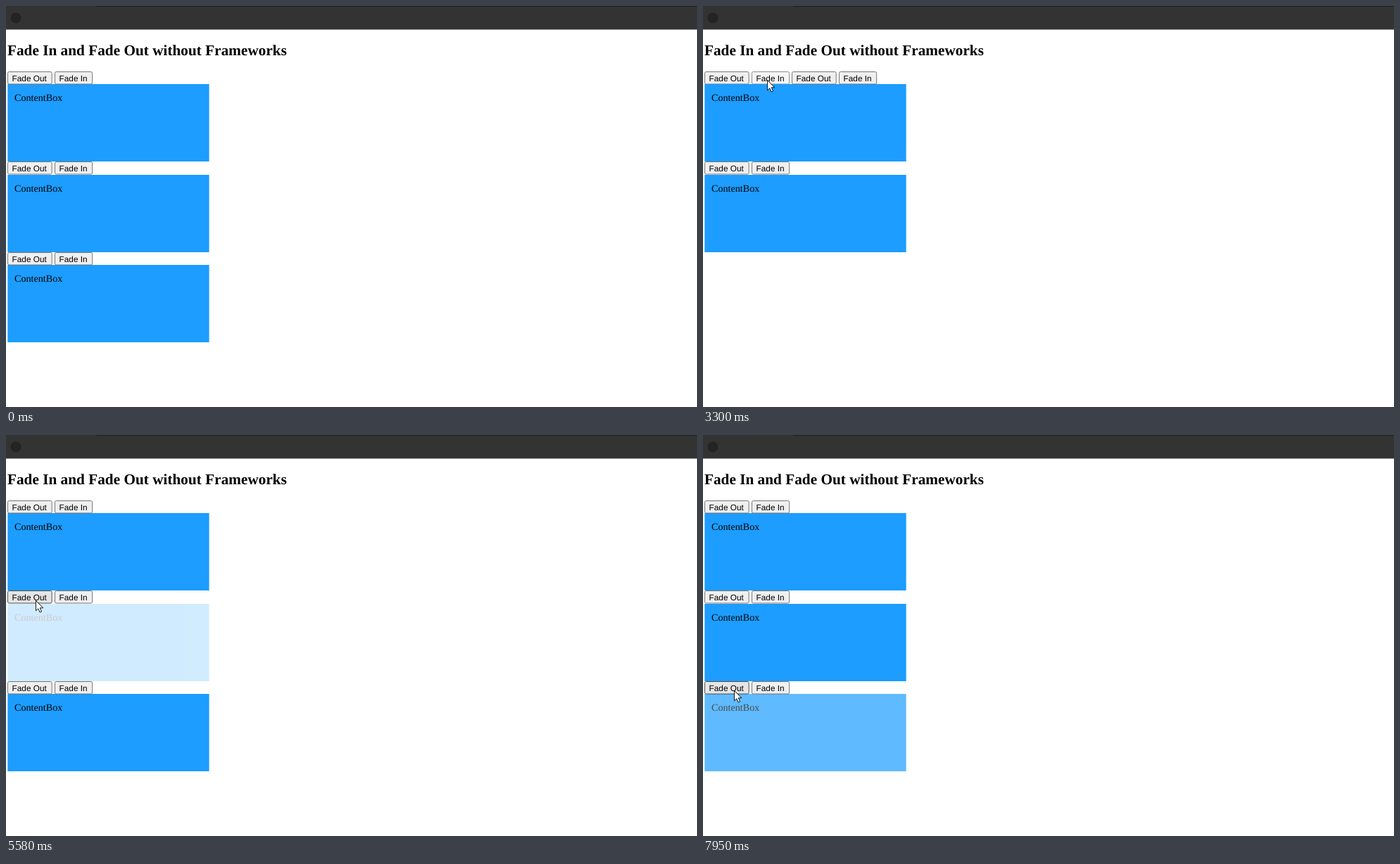
Animation, 982 px wide and 570 px high, one loop 8000 ms. Source, as an HTML page:

```html
<!DOCTYPE html>
<html lang="en">
<head>
<meta charset="utf-8">
<title>Fade In and Fade Out</title>
<style>
  html, body { margin: 0; width: 100%; height: 100%; overflow: hidden; background: #fff; }
  svg { display: block; }
  text { text-rendering: geometricPrecision; font-family: "Liberation Serif", serif; }
  .title { font-size: 21.27px; font-weight: bold; }
  .label { font-size: 14.15px; }
  .button text { font: 11.8px "Liberation Sans", sans-serif; }
  .button rect { fill: #efefef; stroke: #767676; }
  .button.hover rect { fill: #e5e5e5; stroke: #4f4f4f; }
  .button.pressed rect { fill: #f5f5f5; stroke: #8d8d8d; }
</style>
</head>
<body>
<svg width="982" height="570" viewBox="0 0 982 570">
  <rect width="982" height="33.5" fill="#333"/>
  <rect x="128" width="854" height="1" fill="#1e1e1e"/>
  <circle cx="14" cy="17" r="7.5" fill="#242424"/>
  <text class="title" x="2" y="70">Fade In and Fade Out without Frameworks</text>
  <g id="panels"></g>
  <path id="cursor" d="M.5 .5V14.8L3.8 11.8 6.2 17 8.6 16 6.3 10.8H10.9Z" fill="#fff" stroke="#000" stroke-width=".9"/>
</svg>
<script>
const LOOP = 8000, ENTER = 100;
const TOP = 93, ROW = 128.4, PAIR_W = 124, BUTTON_H = 18.5, BOX_H = 110;
const CLICK = 130, TICK = 60, REFRESH = 78;

// The pointer comes in with three strokes, then clicks out and in on each panel in turn.
const strokes = [
  { depart: ENTER, arrive: 250, x: 318, y: 361 },
  { depart: 500, arrive: 650, x: 15, y: 151 },
  { depart: 820, arrive: 980, x: 20, y: 111 }
];
const clicks = [
  { arrive: 1280, press: 1620, x: 33, y: 100 },
  { arrive: 2610, press: 3300, x: 91, y: 105 },
  { arrive: 4780, press: 4930, x: 42, y: 235 },
  { arrive: 5720, press: 6120, x: 92, y: 233 },
  { arrive: 7490, press: 7630, x: 44, y: 363 }
];
// Each trip to a button starts when the previous fade is over.
clicks.forEach((click, i) => {
  click.depart = i ? clicks[i - 1].press + CLICK + 10 * TICK : click.arrive;
});
const moves = [...strokes, ...clicks];

const panelRoot = document.getElementById("panels");
const cursor = document.getElementById("cursor");

function add(parent, tag, attributes = {}, content = "") {
  const node = document.createElementNS("http://www.w3.org/2000/svg", tag);
  for (const name in attributes) node.setAttribute(name, attributes[name]);
  node.textContent = content;
  return parent.appendChild(node);
}

function makeButton(parent, x, width, caption) {
  const node = add(parent, "g");
  add(node, "rect", { x: x + .5, y: .5, width: width - 1, height: BUTTON_H - 1, rx: 2 });
  add(node, "text", { x: x + 6.6, y: 13.6 }, caption);
  return { node, x, width };
}

function makePanel(index) {
  const box = add(panelRoot, "g");
  add(box, "rect", { x: 2.3, width: 286.4, height: BOX_H, fill: "#1c9dff" });
  add(box, "text", { class: "label", x: 12, y: 23.5 }, "ContentBox");
  const controls = add(panelRoot, "g");
  const buttons = [makeButton(controls, 2, 63.7, "Fade Out"), makeButton(controls, 69, 54.2, "Fade In")];
  return { box, controls, buttons, fadeOut: clicks[2 * index], fadeIn: clicks[2 * index + 1] };
}
const panels = [0, 1, 2].map(makePanel);

function pointerAt(t) {
  let x = 820, y = 553;
  for (const move of moves) {
    if (t < move.depart) break;
    const k = Math.min(1, (t - move.depart) / (move.arrive - move.depart || 1));
    x += (move.x - x) * k;
    y += (move.y - y) * k;
  }
  return { x: Math.round(x), y: Math.round(y) };
}

// Fade steps done since a click, seen only at each screen refresh; negative before it.
function stepsSince(click, t) {
  if (!click) return -1;
  const seen = Math.floor((t - click.press) / REFRESH) * REFRESH;
  return Math.floor((seen - CLICK) / TICK);
}

function opacityAt({ fadeOut, fadeIn }, t) {
  const rise = stepsSince(fadeIn, t), fall = stepsSince(fadeOut, t);
  if (rise >= 0) return Math.min(10, rise + 1) / 10;
  return Math.min(10, Math.max(0, 10 - fall)) / 10;
}

function draw(t) {
  const pointer = pointerAt(t);
  const pressing = clicks.some(({ press }) => t >= press && t < press + CLICK);
  cursor.style.display = t < ENTER ? "none" : "";
  cursor.setAttribute("transform", `translate(${pointer.x} ${pointer.y})`);

  let x = 0, row = 0;
  const rowTop = n => Math.round(TOP + ROW * n);
  for (const panel of panels) {
    const y = rowTop(row), opacity = opacityAt(panel, t);
    panel.controls.setAttribute("transform", `translate(${x} ${y})`);
    for (const button of panel.buttons) {
      const dx = pointer.x - x - button.x, dy = pointer.y - y;
      const hover = dx >= 0 && dx < button.width && dy >= 0 && dy < BUTTON_H;
      button.node.setAttribute("class", "button" + (hover ? pressing ? " pressed" : " hover" : ""));
    }
    panel.box.setAttribute("opacity", opacity);
    panel.box.setAttribute("transform", `translate(0 ${rowTop(row + 1) - BOX_H})`);
    // A hidden box lets the next pair of buttons flow onto the same row.
    if (opacity > 0) { x = 0; row++; } else x += PAIR_W;
  }
}

const began = performance.now();
function frame() {
  draw((performance.now() - began) % LOOP);
  requestAnimationFrame(frame);
}
frame();
</script>
</body>
</html>
```
